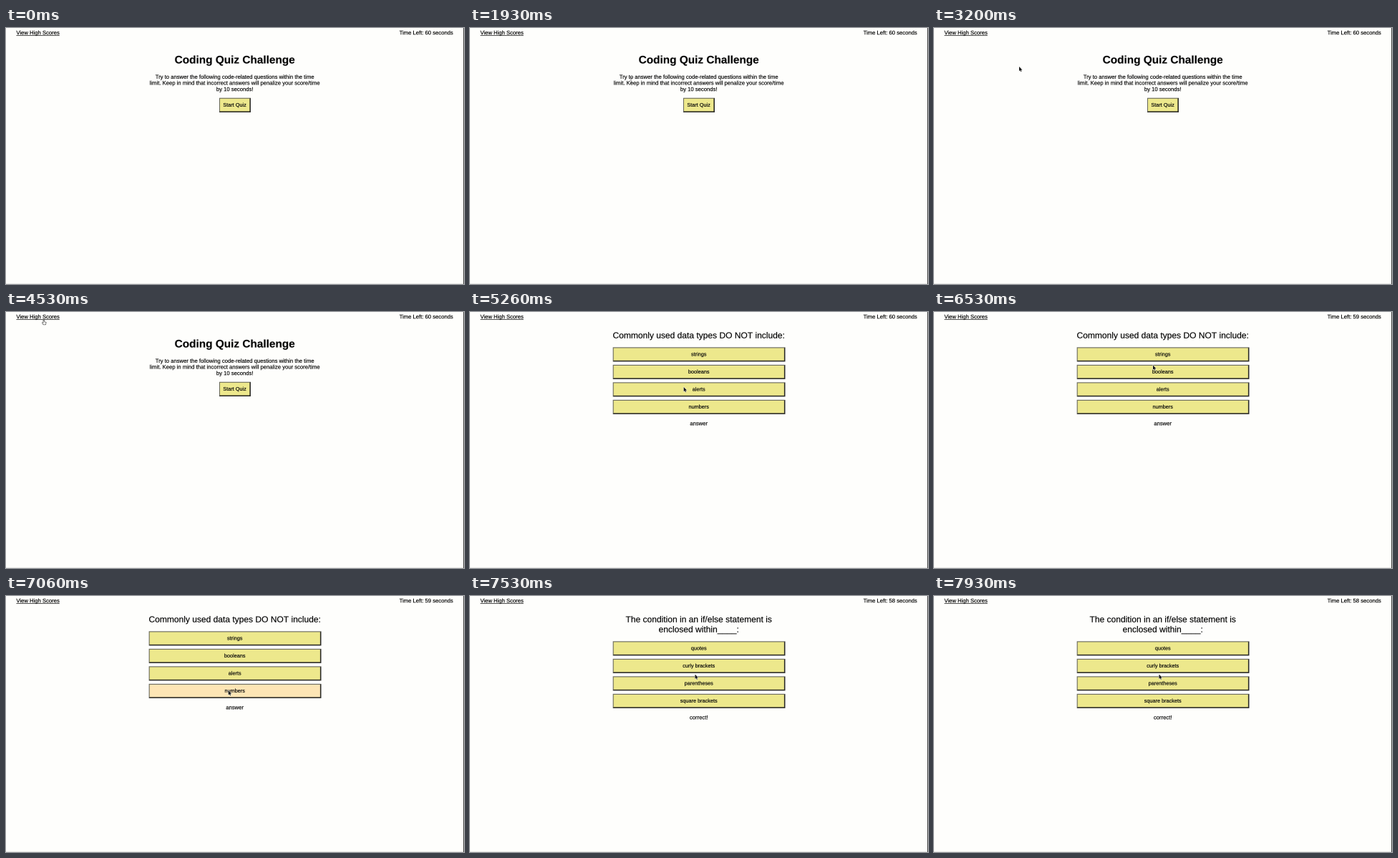
An HTML page with a canvas that plays this animation: 640 by 358 pixels, repeating every 8 s.

```html
<!DOCTYPE html>
<html lang="en">
<head>
<meta charset="utf-8">
<title>Coding Quiz</title>
<style>
  html, body { margin: 0; width: 100%; height: 100%; overflow: hidden; background: #fefefc; }
  canvas { display: block; width: 640px; height: 358px; }
</style>
</head>
<body>
<canvas id="stage"></canvas>
<script>
const W = 640, H = 358, LOOP = 8000, MID = 319.7, SCALE = 4;
const INK = '#080808', KHAKI = '#ede88c', PEACH = '#fde5b5';
const dpr = window.devicePixelRatio || 1;

function setup(canvas, scale) {
  canvas.width = W * scale;
  canvas.height = H * scale;
  const c = canvas.getContext('2d');
  c.scale(scale, scale);
  return c;
}

// The page is drawn large and scaled down, so small text keeps its true shape
const screen = setup(document.getElementById('stage'), dpr);
const page = document.createElement('canvas');
const ctx = setup(page, SCALE);
screen.imageSmoothingQuality = 'high';

function makeQuestion(lines, answers, note) {
  const drop = (lines.length - 1) * 14;
  return {
    lines, note, noteY: 158.5 + drop,
    buttons: answers.map((label, i) => ({ label, x: 199.7, y: 49.4 + drop + i * 24.5, w: 240.8, h: 20 }))
  };
}

const intro = { buttons: [{ label: 'Start Quiz', x: 298, y: 97.8, w: 44, h: 20.2 }] };
const first = makeQuestion(['Commonly used data types DO NOT include:'],
  ['strings', 'booleans', 'alerts', 'numbers'], 'answer');
const second = makeQuestion(['The condition in an if/else statement is', 'enclosed within____:'],
  ['quotes', 'curly brackets', 'parentheses', 'square brackets'], 'correct!');

const sceneAt = t => t < 5260 ? intro : t < 7400 ? first : second;
const secondsAt = t => 60 - Math.max(0, Math.floor((t - 5260) / 1000));
const tickTime = k => Math.floor(k * 20 / 3) * 10;
const inside = (p, x, y, w, h) => p.x >= x && p.x < x + w && p.y >= y && p.y < y + h;

// Pointer trips: leave, arrive, x, y
const trips = [
  [60, 200, 352, 138], [1270, 1930, 225, 73], [1930, 2130, 277, 138], [2130, 2460, 303, 119.5],
  [3130, 3200, 119, 54], [3200, 3330, 316, 111], [3460, 3800, 53, 11.6],
  [4530, 4730, 292, 108], [4930, 5260, 298.7, 105], [7200, 7260, 314.5, 109.6]
];

function pointerAt(t) {
  if (t < 60) return null;
  // Sweeping up and down over the answers
  if (t > 5900 && t <= 7200) {
    return { x: 306 + (t - 6530) * 0.009, y: 103 - 31 * Math.cos((t - 6460) / 540 * Math.PI) };
  }
  let p = { x: 373, y: 130 };
  for (const [leave, arrive, x, y] of trips) {
    const f = Math.min(1, Math.max(0, (t - leave) / (arrive - leave)));
    p = { x: p.x + (x - p.x) * f * (2 - f), y: p.y + (y - p.y) * f * f };
  }
  return p;
}

function text(str, x, y, size, align = 'center', weight = '') {
  ctx.font = `${weight} ${size}px "Liberation Sans", Arial, sans-serif`;
  ctx.textAlign = align;
  ctx.fillStyle = ctx.strokeStyle = INK;
  ctx.lineWidth = 0.18;
  ctx.fillText(str, x, y);
  ctx.strokeText(str, x, y);
}

function rect(color, x, y, w, h) {
  ctx.fillStyle = color;
  ctx.fillRect(x, y, w, h);
}

function drawButton(b, hot) {
  rect('#2b2b26', b.x, b.y, b.w, b.h);
  rect('#66665a', b.x, b.y, b.w - 1, 1);
  rect('#66665a', b.x, b.y, 1, b.h - 1);
  rect(hot ? PEACH : KHAKI, b.x + 1, b.y + 1, b.w - 2.6, b.h - 2.6);
  text(b.label, b.x + b.w / 2 - 0.4, b.y + 12.2, 7.3);
}

function shape(points, fill, stroke, width) {
  ctx.beginPath();
  points.forEach(([x, y]) => ctx.lineTo(x, y));
  ctx.closePath();
  ctx.lineJoin = 'round';
  ctx.lineWidth = width;
  ctx.strokeStyle = stroke;
  ctx.stroke();
  ctx.fillStyle = fill;
  ctx.fill();
}

function drawPointer(p, scene) {
  const onLink = inside(p, 14, 2, 61, 11);
  const onText = scene === intro && (inside(p, 200, 64, 240, 27) || inside(p, 200, 36, 240, 18));
  ctx.save();
  ctx.translate(p.x, p.y);
  if (onLink) {
    shape([[-0.8, 0], [0.3, 0], [0.6, 2.4], [2.9, 3], [2.3, 6], [-0.7, 6], [-2.2, 3.4], [-0.6, 3.6]],
      '#f6f6f4', '#222', 1.1);
  } else if (onText) {
    rect('#444', -0.35, -3.6, 0.7, 7.2);
    rect('#444', -1.5, -4, 3, 0.6);
    rect('#444', -1.5, 3.4, 3, 0.6);
  } else {
    shape([[0, 0], [0, 6.2], [1.4, 5], [2.4, 7.2], [3.3, 6.8], [2.4, 4.7], [4.3, 4.6]],
      '#111', '#f4f4f0', 0.9);
  }
  ctx.restore();
}

function drawIntro() {
  text('Coding Quiz Challenge', MID, 49.6, 15.36, 'center', 'bold');
  ['Try to answer the following code-related questions within the time',
    'limit. Keep in mind that incorrect answers will penalize your score/time',
    'by 10 seconds!'].forEach((line, i) => text(line, MID, 71 + i * 8.6, 7.68));
}

function drawQuestion(q) {
  q.lines.forEach((line, i) => text(line, MID, 36.8 + i * 14, 12.03));
  text(q.note, MID, q.noteY, 7.68);
}

function draw(time) {
  const k = Math.floor((time + 6.7) * 0.015);
  const t = tickTime(k), before = tickTime(Math.max(0, k - 1));
  const scene = sceneAt(t), pointer = pointerAt(t);
  // Hover follows the pointer one tick late
  const last = sceneAt(before) === scene ? pointerAt(before) : null;

  rect('#fefefc', 0, 0, W, H);
  rect('#e9e9e7', 0, 357, W, 1);
  rect('#4a4a4a', 639, 0, 1, H);

  text('View High Scores', 14.4, 9.2, 7.68, 'left');
  rect(INK, 14.4, 10, 60.4, 0.7);
  text(`Time Left: ${secondsAt(t)} seconds`, 624.8, 9.2, 7.68, 'right');

  if (scene === intro) drawIntro();
  else drawQuestion(scene);
  scene.buttons.forEach(b => drawButton(b, last && inside(last, b.x, b.y, b.w, b.h)));
  if (pointer) drawPointer(pointer, scene);
  screen.drawImage(page, 0, 0, W, H);
}

const start = performance.now();
function frame() {
  draw((performance.now() - start) % LOOP);
  requestAnimationFrame(frame);
}
frame();
</script>
</body>
</html>
```
